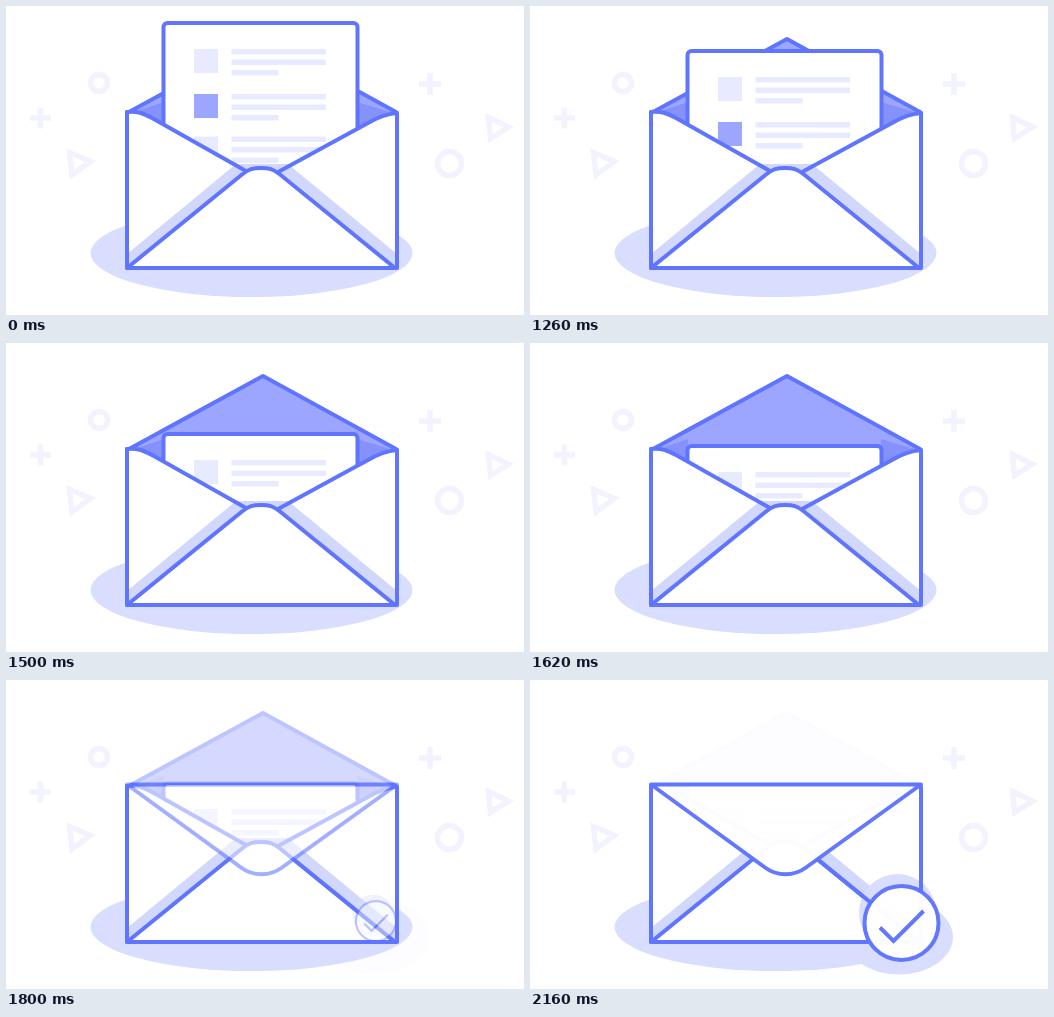
These frames come from a looping animation (518 px wide and 309 px high, 3060 ms). An HTML page:

```html
<!DOCTYPE html>
<html lang="en">
<head>
<meta charset="utf-8">
<title>Sealing an envelope</title>
<style>
  html, body { margin: 0; width: 100%; height: 100%; overflow: hidden; background: #fff; }
  svg { display: block; width: 100%; height: 100%; }
  .line { stroke: #6075ff; stroke-width: 4; stroke-linejoin: round; stroke-linecap: round; }
  .none { fill: none; }
  .white { fill: #fff; }
  .pale { fill: #d9deff; }
  .band { fill: #d2d8fb; }
  .flap { fill: #9ca6ff; }
  .deep { fill: #8592fb; }
  .deco { fill: none; stroke: #f3f3ff; stroke-width: 5.5; }
</style>
</head>
<body>
<svg viewBox="0 0 518 309">
  <defs>
    <g id="scenery">
      <rect class="white" width="518" height="309"/>
      <ellipse class="pale" cx="245.5" cy="247" rx="161" ry="44"/>
      <g class="deco">
        <circle cx="93" cy="77" r="8.5"/>
        <circle cx="443.5" cy="157.5" r="12"/>
        <path d="M24 112H45M34.5 101.500V122.500M413 78H435M424 67V89"/>
        <path d="M63.500 146.500L84.500 155.500L66 169Z M482.500 111.500L502.500 121L484.500 132.500Z"/>
      </g>
    </g>
    <path id="shade" class="band" d="M121 248L230 158H282L391 248V262H121Z"/>
    <path id="front" class="line white" d="M121 262L236 168.500C243 163 247 162 255 162C263 162 267 163 274 168.500L389 262Z"/>
    <path id="frame" class="line none" d="M121 106V262H391V107"/>
  </defs>

  <g id="open">
    <use href="#scenery"/>
    <path class="line flap" d="M123 106L257 33L390 106L273 166H240Z"/>
    <path class="deep" d="M128 106L158 96V121L143 112Z M384 106L351 96V123L368 112Z"/>
    <g id="letter">
      <rect class="line white" x="157.500" y="17" width="194" height="155" rx="4"/>
      <g id="rows"></g>
    </g>
    <path class="white" d="M121 106C131 105 137 107 146 112L240 165H273L362 117C372 111 380 108 391 107V262H121Z"/>
    <use href="#shade"/>
    <path class="line none" d="M121 106C131 105 137 107 146 112L240 165M273 165.500L362 117C372 111 380 108 391 107"/>
    <use href="#front"/>
    <use href="#frame"/>
  </g>

  <g id="closed">
    <use href="#scenery"/>
    <ellipse id="glow" class="pale" cx="369" cy="257" rx="54" ry="37.500"/>
    <rect class="white" x="121" y="104" width="270" height="158"/>
    <use href="#shade"/>
    <use href="#front"/>
    <g class="badge"><circle class="pale" cx="367.500" cy="232.500" r="38.500"/></g>
    <path class="line none" d="M288 179.500L389 262"/>
    <use href="#frame"/>
    <path class="line white" d="M121 104.500H391L276 187.500C264 196.500 247 196.500 235 187.500Z"/>
    <g class="badge">
      <circle class="line white" cx="371.500" cy="243" r="37"/>
      <path class="line none" style="stroke-linecap:butt;stroke-linejoin:miter" d="M350 247.500L363.500 261L393.500 231"/>
    </g>
  </g>
</svg>
<script>
  const LOOP = 3060, STEP = 60;
  const SLIDE = [0, 2.5, 13.5, 28, 41.5, 54, 65, 74, 82, 86];
  const FADE = [0, .22, .42, .58, .72, .83, .9, .95, .98, .98];
  const GROW = [0, 0, .28, .54, .72, .85, .93, .97, 1, 1];

  const $ = id => document.getElementById(id);
  const badges = document.querySelectorAll('.badge');

  const box = (x, y, w, h, fill) =>
    `<rect x="${x}" y="${y}" width="${w}" height="${h}" fill="${fill}"/>`;

  $('rows').innerHTML = [43, 88, 130.5].map((y, i) =>
    box(188, y, 24, 24, i === 1 ? '#9ca6ff' : '#e8ebff') +
    [94.5, 94.5, 47].map((w, j) => box(225.5, y + j * 10.5, w, 5.5, '#e8ebff')).join('')
  ).join('');

  // Value of a stepped table whose first change happens at `start`.
  function pick(table, t, start) {
    const i = Math.floor((t - start) / STEP) + 1;
    return table[Math.max(0, Math.min(table.length - 1, i))];
  }

  function draw(t) {
    const grow = pick(GROW, t, 1680);
    $('letter').setAttribute('transform', `translate(0 ${pick(SLIDE, t, 1140)})`);
    $('closed').setAttribute('opacity', pick(FADE, t, 1680));
    $('glow').setAttribute('opacity', grow ** 4);
    for (const b of badges) {
      b.setAttribute('transform', `translate(368 239) scale(${grow}) translate(-368 -239)`);
      b.setAttribute('opacity', Math.min(1, grow * 1.3));
    }
  }

  const begin = performance.now();
  function tick() {
    draw((performance.now() - begin) % LOOP);
    requestAnimationFrame(tick);
  }
  tick();
</script>
</body>
</html>
```
